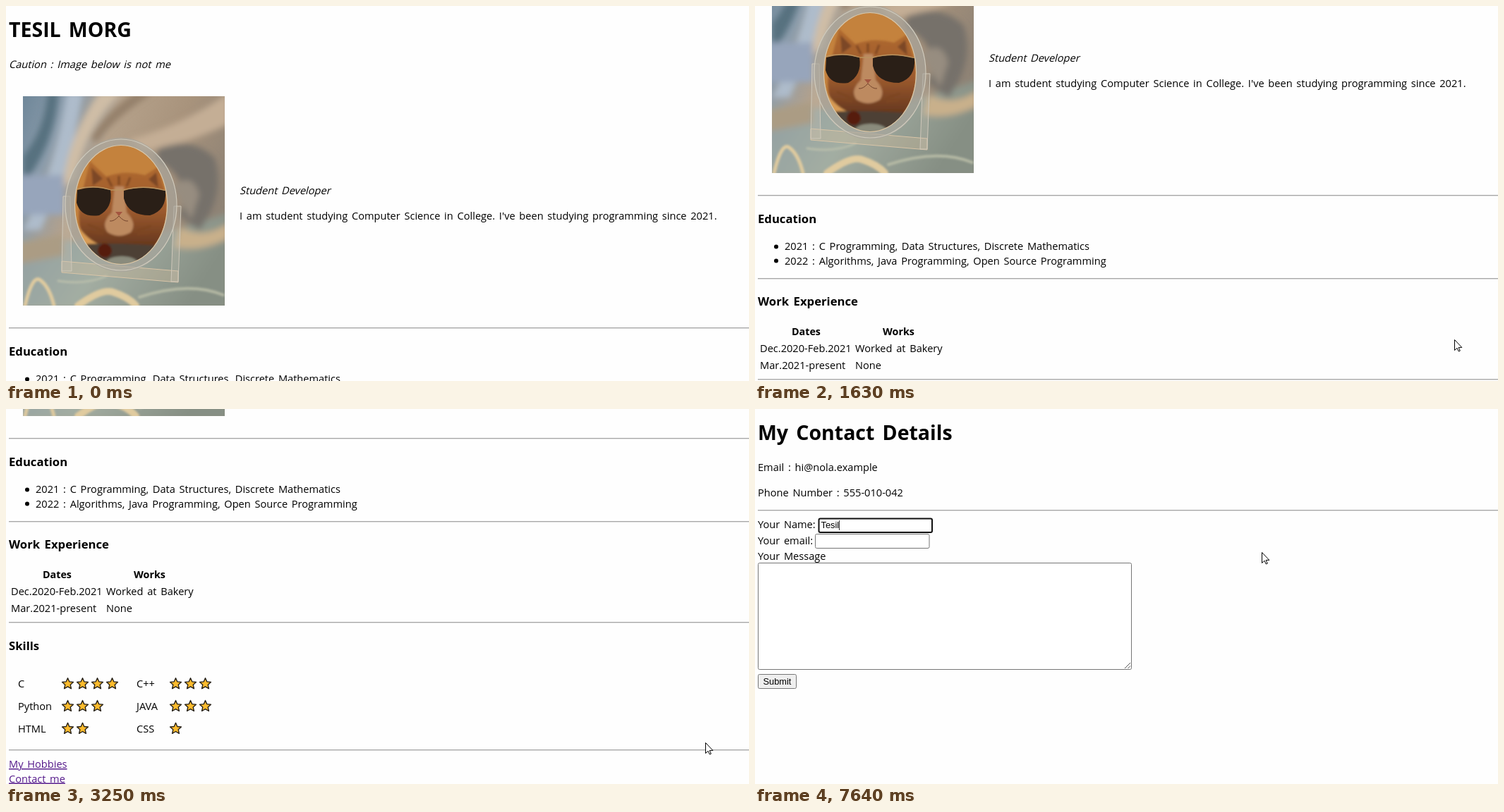
Animation, 1053 px wide and 532 px high, one loop 8 s. Source, as an HTML page:

```html
<!DOCTYPE html>
<html lang="en">
<head>
<meta charset="utf-8">
<title>Resume page</title>
<style>
  html, body { margin: 0; width: 100%; height: 100%; overflow: hidden; background: #fefefe; }
  #stage { display: block; }
  text { font: 14.6px "Open Sans", "Noto Sans", sans-serif; word-spacing: .132em; white-space: pre; }
  .h1 { font-size: 28.5px; font-weight: 700; }
  .h3 { font-size: 16.7px; font-weight: 700; }
  .th { font-size: 14.3px; font-weight: 700; text-anchor: middle; }
  .link { fill: #551a8b; text-decoration: underline; }
  .ui { font: 12.8px "Liberation Sans", Arial, sans-serif; word-spacing: 0; }
  .box { fill: #fff; stroke: #767676; }
</style>
</head>
<body>
<svg id="stage" width="1053" height="532" viewBox="0 0 1053 532">
  <defs>
    <linearGradient id="satin" x2="1" y2=".45">
      <stop offset="0" stop-color="#6f8799"/><stop offset=".2" stop-color="#8b9cab"/>
      <stop offset=".42" stop-color="#b5a18a"/><stop offset=".7" stop-color="#a8937c"/>
      <stop offset="1" stop-color="#8f8375"/>
    </linearGradient>
    <linearGradient id="cloth" x2="1" y2=".3">
      <stop offset="0" stop-color="#8e9da3"/><stop offset=".5" stop-color="#a3ada2"/>
      <stop offset="1" stop-color="#868f84"/>
    </linearGradient>
    <linearGradient id="fur" x2="0" y2="1">
      <stop offset="0" stop-color="#b06a2e"/><stop offset=".55" stop-color="#9c5a2e"/>
      <stop offset="1" stop-color="#5e321b"/>
    </linearGradient>
    <filter id="soft" x="-30%" y="-30%" width="160%" height="160%"><feGaussianBlur stdDeviation="4"/></filter>
    <filter id="fine" x="-30%" y="-30%" width="160%" height="160%"><feGaussianBlur stdDeviation="1.8"/></filter>
    <clipPath id="oval"><ellipse cx="139" cy="154" rx="65" ry="84"/></clipPath>

    <svg id="photo" width="286" height="297">
      <rect width="286" height="297" fill="url(#satin)"/>
      <g filter="url(#soft)">
        <path d="M62 -5H85L66 95L25 190H0Q45 110 62 -5Z" fill="#aebccb"/>
        <path d="M35 -5H50Q45 70 0 125V85Q30 50 35 -5Z" fill="#57717f"/>
        <path d="M108 -5H140Q90 40 74 118L56 130Q62 60 108 -5Z" fill="#cfbda6"/>
        <path d="M160 -5H185Q130 30 105 65L95 60Q120 20 160 -5Z" fill="#94806b"/>
        <path d="M150 62Q230 40 291 -5V40Q225 70 170 78Z" fill="#c4ae95"/>
        <path d="M-5 112H58V168H-5Z" fill="#97a5bb"/>
        <path d="M-5 200Q150 220 291 165V302H-5Z" fill="url(#cloth)"/>
        <path d="M190 75Q240 55 272 88Q288 140 250 190L222 170Q240 115 190 92Z" fill="#76716a"/>
        <path d="M212 128Q240 105 250 140L238 175Z" fill="#978d80"/>
        <path d="M222 185Q255 205 291 180V202Q250 222 215 214Z" fill="#c9b08b"/>
        <path d="M-5 207L58 196V226L-5 238Z" fill="#ab9c84"/>
      </g>
      <g fill="none" stroke="#e0cb9f" stroke-linecap="round" filter="url(#fine)">
        <path d="M3 297Q14 250 26 262Q38 272 44 297" stroke-width="5"/>
        <path d="M78 297Q112 272 128 278Q150 285 160 297" stroke-width="10"/>
        <path d="M50 262Q90 268 118 255" stroke-width="3" stroke="#b9beab"/>
        <path d="M165 285Q235 262 284 282" stroke-width="4" stroke="#b5b9a4"/>
      </g>
      <path d="M55 234L220 248V264L55 250Z" fill="#d9bf9d" fill-opacity=".3" stroke="#d9c5a8"/>
      <path d="M57 142H67L69 248H55ZM214 156H224L220 263H210Z" fill="#c9c3b5" fill-opacity=".25" stroke="#cfc8ba"/>
      <ellipse cx="139" cy="154" rx="72" ry="89" fill="none" stroke="#a9a79d" stroke-opacity=".65" stroke-width="13"/>
      <ellipse cx="139" cy="154" rx="79" ry="93" fill="none" stroke="#cfcabc" stroke-width="1.2"/>
      <g clip-path="url(#oval)">
        <rect width="286" height="297" fill="#c4823d"/>
        <g filter="url(#fine)">
          <path d="M84 137L95 92L118 114Q145 104 173 112L192 100L202 140Q212 190 180 219H98Q70 190 84 137Z" fill="url(#fur)"/>
          <path d="M97 101L113 117L99 127ZM189 108L178 118L192 130Z" fill="#7c4727"/>
          <path d="M72 175Q88 202 108 210L98 225H58Z" fill="#d89b55"/>
          <path d="M120 116L126 128M136 113V126M152 115L147 128M92 182L112 190M94 192L114 196M182 184L162 190M180 194L162 196" stroke="#7d4522" stroke-width="3"/>
          <path d="M130 128H143L147 165Q162 180 153 193Q136 203 120 193Q110 180 126 165Z" fill="#bd8a60"/>
          <path d="M70 211Q135 206 210 214V245H70Z" fill="#4d4136"/>
          <ellipse cx="140" cy="236" rx="22" ry="9" fill="#8a8b7c"/>
          <circle cx="116" cy="219" r="10" fill="#561c0f"/>
        </g>
        <path d="M131 164H141L136 170Z" fill="#a3553f"/>
        <path d="M136 170Q129 178 123 177M136 170Q143 178 149 177" fill="none" stroke="#74452d"/>
        <path d="M77 133Q100 126 124 133Q128 158 108 169Q82 173 76 151ZM143 134Q170 126 202 134Q204 162 180 169Q149 169 143 145Z" fill="#2a1f17"/>
        <path d="M75 132Q101 125 125 133H142Q172 125 203 134" fill="none" stroke="#b9935f" stroke-width="1.3"/>
      </g>
      <ellipse cx="139" cy="154" rx="65.5" ry="84.5" fill="none" stroke="#dcc8a8" stroke-width="1.2"/>
    </svg>
  </defs>
  <g id="home"></g>
  <g id="contact"></g>
  <g id="pointer" stroke="#000" fill="#fff"><path id="shape"/></g>
</svg>
<script>
const $ = id => document.getElementById(id);
const LOOP = 8000, NAME = "Tesil";

const text = (x, y, s, cls = "") => `<text x="${x}" y="${y}" class="${cls}">${s}</text>`;
const slanted = (x, y, s) => `<g transform="translate(${x} ${y}) skewX(-14)">${text(0, 0, s)}</g>`;
const rule = y => `<path d="M4 ${y - .5}H1053" stroke="#a6a6a6"/><path d="M4 ${y + .5}H1053" stroke="#dedede"/>`;
const box = (x, y, w, h, attrs = "") =>
  `<rect class="box" x="${x}" y="${y}" width="${w}" height="${h}" rx="2" ${attrs}/>`;

function star(x, y) {
  const points = Array.from({ length: 10 }, (_, i) => {
    const r = i % 2 ? 3.9 : 8.3, a = i * Math.PI / 5;
    return `${(x + r * Math.sin(a)).toFixed(2)},${(y - r * Math.cos(a)).toFixed(2)}`;
  });
  return `<polygon points="${points.join(" ")}" fill="#fdbb2d" stroke="#252018" stroke-width="1.4" stroke-linejoin="round"/>`;
}

function skill(x, row, label, starX, count) {
  const y = 805 + row * 31.8;
  let out = text(x, y + 5, label);
  for (let i = 0; i < count; i++) out += star(starX + i * 21, y);
  return out;
}

$("home").innerHTML = [
  text(4, 44, "TESIL MORG", "h1"),
  slanted(4, 88, "Caution : Image below is not me"),
  '<use href="#photo" x="24" y="128"/>',
  slanted(331, 267, "Student Developer"),
  text(331, 303, "I am student studying Computer Science in College. I've been studying programming since 2021."),
  ...[457, 575, 718, 899].map(rule),
  text(4, 496, "Education", "h3"),
  '<circle cx="30" cy="529.5" r="3"/><circle cx="30" cy="549.5" r="3"/>',
  text(42, 534, "2021 : C Programming, Data Structures, Discrete Mathematics"),
  text(42, 554.5, "2022 : Algorithms, Java Programming, Open Source Programming"),
  text(4, 613, "Work Experience", "h3"),
  text(72.5, 655, "Dates", "th"), text(203.5, 655, "Works", "th"),
  text(7, 679, "Dec.2020-Feb.2021"), text(142, 679, "Worked at Bakery"),
  text(7, 703, "Mar.2021-present"), text(142, 703, "None"),
  text(4, 757, "Skills", "h3"),
  skill(17, 0, "C", 87.5, 4), skill(185, 0, "C++", 240.5, 3),
  skill(17, 1, "Python", 87.5, 3), skill(185, 1, "JAVA", 240.5, 3),
  skill(17, 2, "HTML", 87.5, 2), skill(185, 2, "CSS", 240.5, 1),
  text(4, 924, "My Hobbies", "link"), text(4, 944.5, "Contact me", "link")
].join("");

$("contact").innerHTML = [
  text(4, 44, "My Contact Details", "h1"),
  text(4, 88, "Email : hi@nola.example"),
  text(4, 124, "Phone Number : 555-010-042"),
  rule(144),
  text(4, 169, "Your Name:"), box(90.5, 155.5, 160.5, 19.5, 'id="field"'),
  text(4, 192, "Your email:"), box(85.5, 177.5, 161.5, 20),
  text(4, 214, "Your Message"), box(4.5, 218.5, 529, 151),
  '<path d="M524 368L532 360M528.5 368L532 364.5" stroke="#555"/>',
  box(4.5, 376.5, 54, 20, 'style="fill:#efefef"'),
  text(11.5, 390.5, "Submit", "ui"),
  '<text id="typed" class="ui" x="93.5" y="169"></text>',
  '<path id="caret" d="M.5 158V172" stroke="#333"/>'
].join("");

const SHAPES = {
  arrow: "M.5 .5V15.5L4 12.2L6.3 17L8.3 16.1L6.1 11.4H10.8Z",
  hand: "M-1.5 1Q0 -1 1.5 1V6L7.5 7.5Q9.5 8.5 9 11.5L8 17H0L-5 10.5Q-5 8 -3 9L-1.5 10.5Z",
  beam: "M-4 -7.5H4M-4 7.5H4M0 -7.5V7.5"
};

// Eased progress, held between n evenly spaced updates from first to last.
function glide(t, start, first, last, n) {
  if (t < first) return 0;
  const gap = (last - first) / (n - 1);
  const at = Math.min(last, first + Math.floor((t - first) / gap + 1e-6) * gap);
  const p = (at - start) / (last - start);
  return p * p * (3 - 2 * p);
}

const SCROLLS = [ // distance, then timing
  [95.3, 912, 1000, 1210, 4],
  [190.7, 1360, 1490, 1910, 7],
  [129, 2620, 2700, 3250, 8]
];
const MOVES = [ // destination, then timing
  [991, 473, 460, 460, 670, 4],
  [72, 521, 3580, 3650, 4410, 12],
  [151, 172, 4810, 4880, 5640, 11],
  [718, 203, 5710, 5710, 5990, 5]
];
const KEYS = [6920, 7250, 7450, 7545, 7640];
const OPEN = 4480, FOCUS = 5640, BLINK = 530;

function pointerAt(t) {
  let x = 997, y = 512;
  for (const [toX, toY, ...timing] of MOVES) {
    const p = glide(t, ...timing);
    x += (toX - x) * p;
    y += (toY - y) * p;
  }
  return [x, y];
}

function pointerKind(x, y, onHome) {
  const over = (l, t, r, b) => x >= l && x <= r && y >= t && y <= b;
  if (onHome) return over(4, 513, 84, 532) ? "hand" : "arrow";
  return over(90, 155, 252, 176) || over(85, 177, 248, 198) || over(4, 218, 534, 370) ? "beam" : "arrow";
}

function show(id, on) { $(id).style.display = on ? "" : "none"; }

function draw(now) {
  const t = now % LOOP, onHome = t < OPEN;
  show("home", onHome);
  show("contact", !onHome);

  const scroll = SCROLLS.reduce((sum, [d, ...timing]) => sum + d * glide(t, ...timing), 0);
  $("home").setAttribute("transform", `translate(0 ${-Math.round(scroll)})`);

  const focused = t >= FOCUS;
  $("field").style.cssText = focused ? "stroke:#101010;stroke-width:2" : "";
  const count = KEYS.filter(k => t >= k).length;
  $("typed").textContent = NAME.slice(0, count);
  const width = count ? $("typed").getComputedTextLength() : 0;
  $("caret").setAttribute("transform", `translate(${Math.round(93 + width)} 0)`);
  show("caret", focused && (count || Math.floor((t - FOCUS + 40) / BLINK) % 2 === 0));

  const [x, y] = pointerAt(t).map(Math.round);
  show("pointer", t >= 460);
  $("pointer").setAttribute("transform", `translate(${x} ${y})`);
  $("shape").setAttribute("d", SHAPES[pointerKind(x, y, onHome)]);
}

const begin = performance.now();
function tick() {
  draw(performance.now() - begin);
  requestAnimationFrame(tick);
}
tick();
</script>
</body>
</html>
```
